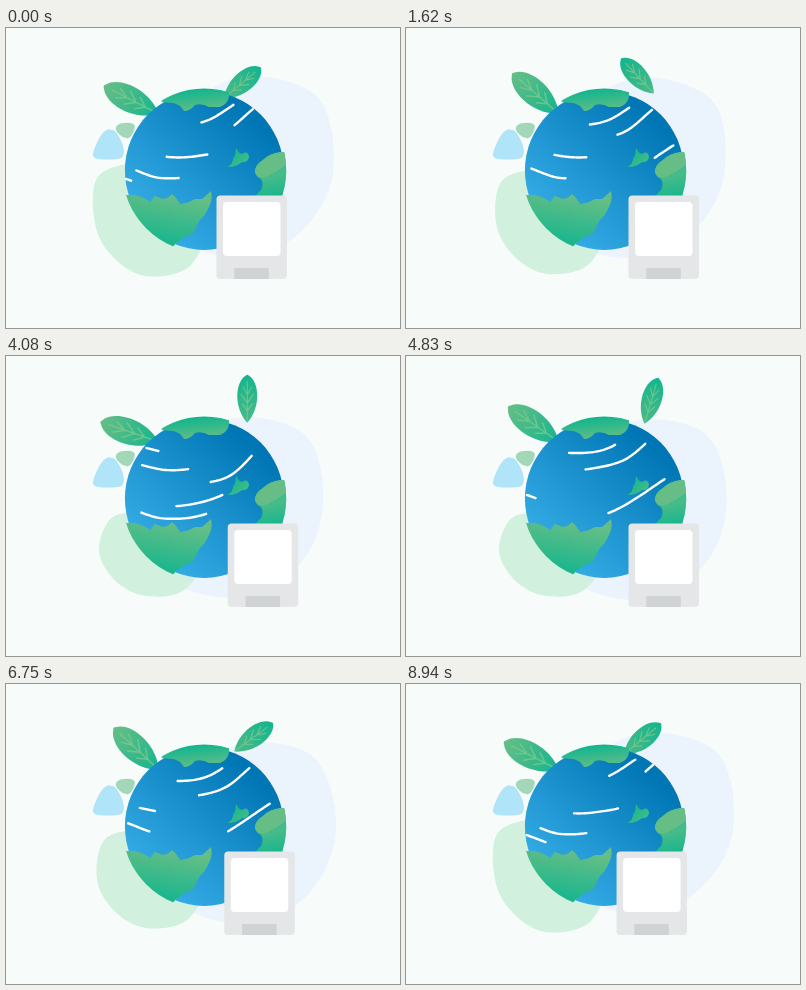
Recreate the animation shown at these times as an HTML page with a canvas. Size 394x300 px, loop 8.97 s.

```html
<!DOCTYPE html>
<html lang="en">
<head>
<meta charset="utf-8">
<title>Green planet</title>
<style>
html, body { margin: 0; width: 100%; height: 100%; overflow: hidden; background: #f7fbfa; }
canvas { display: block; }
</style>
</head>
<body>
<canvas id="stage" width="394" height="300"></canvas>
<script>
const c = document.getElementById('stage').getContext('2d');
const LOOP = 8970, STEP = 30, STREAK_STEPS = 59, RAD = Math.PI / 180;
const LIGHT = '#66be86', TEAL = '#13b58e';

const wave = degrees => Math.cos(degrees * RAD);
const ease = u => { u = Math.min(Math.max(u, 0), 1); return u * u * (3 - 2 * u); };

// Smooth curve through a few [position, value] points
function curve(keys, t) {
  const last = keys.length - 1;
  let i = 0;
  while (i < last - 1 && keys[i + 1][0] < t) i++;
  const p = keys[Math.max(i - 1, 0)], a = keys[i], b = keys[i + 1], n = keys[Math.min(i + 2, last)];
  const d = b[0] - a[0], u = (t - a[0]) / d, u2 = u * u, u3 = u2 * u;
  const slope = (from, to) => (to[1] - from[1]) / (to[0] - from[0]) * d;
  return a[1] + (b[1] - a[1]) * (3 * u2 - 2 * u3)
    + (u3 - 2 * u2 + u) * slope(p, b) + (u3 - u2) * slope(a, n);
}

function gradient(x0, y0, x1, y1, from, to) {
  const g = c.createLinearGradient(x0, y0, x1, y1);
  g.addColorStop(0, from);
  g.addColorStop(1, to);
  return g;
}

function fill(path, style) {
  c.fillStyle = style;
  c.fill(path);
}

function roundBox(x, y, w, h, r, style) {
  c.fillStyle = style;
  c.beginPath();
  c.roundRect(x, y, w, h, r);
  c.fill();
}

// Closed smooth outline from eight radii, clockwise from the right;
// swell(angle) is added to each radius
function blob(cx, cy, radii, swell, style) {
  const pts = radii.map((base, i) => {
    const r = base + swell(i * 45);
    return [cx + r * wave(i * 45), cy + r * wave(i * 45 - 90)];
  });
  const at = i => pts[(i + 8) % 8];
  c.beginPath();
  c.moveTo(...pts[0]);
  for (let i = 0; i < 8; i++) {
    const p = at(i - 1), a = at(i), b = at(i + 1), n = at(i + 2);
    c.bezierCurveTo(a[0] + (b[0] - p[0]) / 6, a[1] + (b[1] - p[1]) / 6,
      b[0] - (n[0] - a[0]) / 6, b[1] - (n[1] - a[1]) / 6, ...b);
  }
  c.fillStyle = style;
  c.fill();
}

const disc = r => {
  const path = new Path2D();
  path.arc(198.3, 142.5, r, 0, Math.PI * 2);
  return path;
};
const globe = disc(79.4), landEdge = disc(82);
const drop = new Path2D('M87 125Q91 112 97 105Q103 98 110 104Q117 114 118 123Q118 130 112 131Q100 132 92 131Q86 130 87 125Z');
const pebble = new Path2D('M110 99Q112 95 119 95Q127 94 129 98Q128 106 123 110Q118 111 114 107Q109 103 110 99Z');
const north = new Path2D('M156 74L167 75Q174 76 178 83Q184 83 189 77Q196 75 203 79L214 79Q222 76 223 68V55H150Z');
const south = new Path2D('M112 167L129 167Q138 169 144 174L149 168L157 171Q163 170 166 166Q170 169 174 176Q183 175 189 171L196 171L205 163Q207 172 203 179Q199 188 193 193Q189 200 187 206Q179 207 175 212Q169 215 167 219V228H110Z');
const east = new Path2D('M285 124H275Q264 125 257 132Q249 137 249 144Q250 149 255 151Q258 155 255 162L249 168V180H285Z');
const eastTop = new Path2D('M285 124H275Q264 125 257 132Q249 137 249 144Q251 151 259 149Q272 144 285 132Z');
const island = new Path2D('M230 119Q232 125 236 126Q242 122 243 129Q242 135 236 134Q231 139 221 139Q227 136 227 131Q230 126 230 119Z');
const leafShape = new Path2D('M0 0C-17 -16 -14 -41 -2 -47Q0 -49 2 -47C14 -41 17 -16 0 0Z');
const leafVeins = new Path2D('M0 -2V-41M0 -12L-6 -19M0 -12L6 -19M0 -20L-7 -28M0 -20L7 -28M0 -28L-5 -36M0 -28L5 -36');

// Swing of each leaf: [ms, degrees]
const leftSwing = [[0, -63], [1620, -49], [3120, -73], [4080, -71], [5610, -42], [7950, -58], [LOOP, -63]];
const rightSwing = [[0, 50], [900, 50], [1620, -43], [3120, 50], [4080, 0], [5610, 41], [7950, 59], [LOOP, 50]];

// Wind lanes: the front slows down by `lead`, the tail speeds up by `lag`
const lanes = [
  { start: 14, life: 58, lead: 2, lag: 2, path: [[140, 92], [165, 97], [200, 93], [232, 74]] },
  { start: 7, life: 57, lead: 2.7, lag: 1.9, path: [[131, 108], [160, 114], [189, 112], [220, 103], [247, 81]] },
  { start: 44, life: 54, lead: 2.7, lag: 1, path: [[124, 122], [163, 129], [191, 128], [225, 119], [256, 89]] },
  { start: 40, life: 54, lead: 1.2, lag: 2.5, path: [[121, 139], [155, 150], [200, 145], [248, 124]] },
  { start: -1, life: 59, lead: 2, lag: 2, path: [[120, 151], [158, 162.5], [205, 156], [268, 117]] }
];

function leaf(x, y, angle, size, pivot, tip, base) {
  c.save();
  c.translate(x, y);
  c.rotate(angle * RAD);
  c.scale(size * .84, size);
  c.translate(0, pivot);
  fill(leafShape, gradient(0, -48, 0, 0, tip, base));
  c.strokeStyle = 'rgba(126,200,140,.8)';
  c.lineWidth = 1.3;
  c.stroke(leafVeins);
  c.restore();
}

function streak({ start, life, lead, lag, path }, t) {
  const age = (t / STEP - start + STREAK_STEPS) % STREAK_STEPS, u = age / life;
  if (u >= 1) return;
  const left = path[0][0], width = path[path.length - 1][0] - left;
  const tail = left + width * u ** lag, front = left + width * (1 - (1 - u) ** lead);
  if (front - tail < .5) return;
  c.beginPath();
  for (let i = 0; i <= 24; i++) {
    const x = tail + (front - tail) * i / 24;
    c.lineTo(x, curve(path, x));
  }
  c.stroke();
}

function planet(t) {
  fill(globe, gradient(140, 200, 243, 88, '#38aee8', '#0076b5'));
  c.save();
  c.clip(landEdge);
  fill(north, gradient(190, 62, 192, 84, TEAL, LIGHT));
  fill(south, gradient(165, 165, 155, 218, LIGHT, TEAL));
  fill(east, gradient(262, 150, 266, 172, '#45bb89', TEAL));
  fill(eastTop, LIGHT);
  fill(island, gradient(226, 122, 240, 138, TEAL, '#48bc8a'));
  c.restore();
  c.strokeStyle = '#fff';
  c.lineWidth = 2.4;
  c.lineCap = 'round';
  lanes.forEach(lane => streak(lane, t));
}

function device(t) {
  const u = t / LOOP * 3 % 1;
  const x = 210.5 + 12 * (ease(u / .43) - ease((u - .75) / .25));
  roundBox(x, 167.5, 70.5, 83.5, 4, '#e4e6e8');
  roundBox(x + 6.5, 174, 57.5, 54, 4, '#fff');
  roundBox(x + 17.8, 240, 34.5, 11, 0, '#d0d3d4');
}

function draw(now) {
  const t = now % LOOP, turn = t / LOOP * 360;
  c.fillStyle = '#f7fbfa';
  c.fillRect(0, 0, 394, 300);

  blob(235, 145, [88, 86, 91, 98, 70, 80, 89, 100], a => 8 * wave(turn + a + 60), '#ebf4fc');
  // The top of the green blob breathes, the bottom follows weakly
  const swell = a => Math.max(wave(a + 100), -.35 * wave(a + 100)) * 12 * wave(turn);
  blob(140, 195, [60, 58, 49, 45, 49, 57, 48, 48], swell, '#d1f1de');
  fill(drop, '#b0e4f8');
  fill(pebble, '#a2d8b8');

  leaf(153, 86, curve(leftSwing, t), 1.29, 0, LIGHT, TEAL);
  leaf(240 + 8.5 * wave(turn - 245), 49.2 + 6.8 * wave(turn + 35),
    curve(rightSwing, t), 1, 24, TEAL, '#4bba88');
  planet(t);
  device(t);
  requestAnimationFrame(draw);
}
requestAnimationFrame(draw);
</script>
</body>
</html>
```
